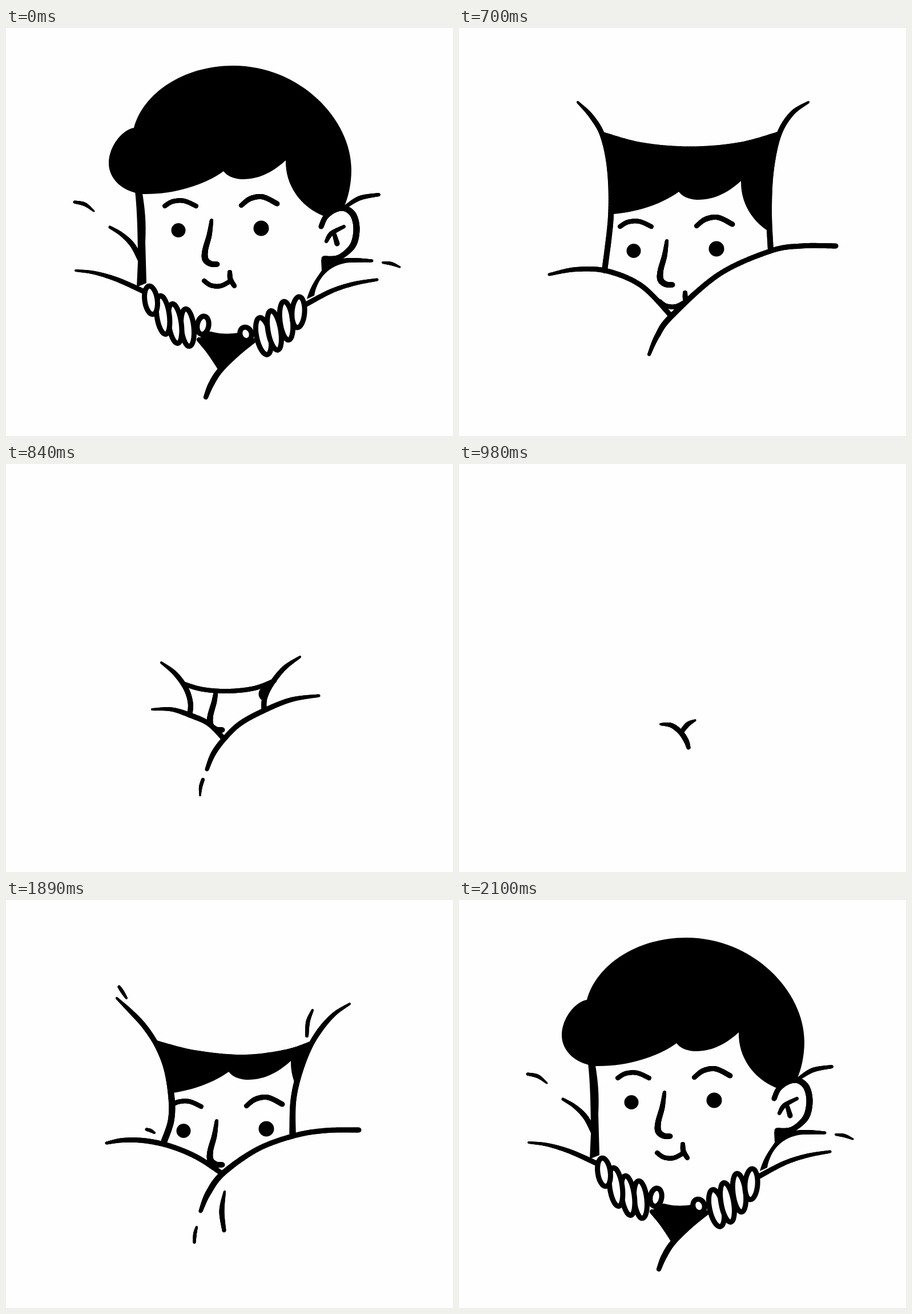
Animation, 783 px wide and 715 px high, one loop 2.66 s. Source, as an HTML page with a canvas:

```html
<!DOCTYPE html>
<html lang="en">
<head>
<meta charset="utf-8">
<title>Peekaboo</title>
<style>
  html, body { margin: 0; width: 100%; height: 100%; overflow: hidden; background: #fefefe; }
  canvas { display: block; }
</style>
</head>
<body>
<canvas id="stage" width="783" height="715"></canvas>
<script>
const ctx = document.getElementById('stage').getContext('2d');
const INK = '#000', PAPER = '#fefefe';
const LOOP = 2660, STEP = 70, CLOSE_AT = 630, OPEN_AT = 1750;

function spline(a, b, c, d, t) {
  return b + t / 2 * (c - a + t * (2 * a - 5 * b + 4 * c - d + t * (3 * (b - c) + d - a)));
}

// Smooth stroke of varying width through x, y, width triples.
function brush(...v) {
  const last = v.length / 3 - 1;
  const at = (i, k) => v[Math.max(0, Math.min(last, i)) * 3 + k];
  const point = (i, t) => [0, 1, 2].map(k => spline(at(i - 1, k), at(i, k), at(i + 1, k), at(i + 2, k), t));
  let [px, py] = v;
  for (let i = 0; i < last; i++) {
    for (let s = 1; s <= 16; s++) {
      const [x, y, w] = point(i, s / 16);
      ctx.lineWidth = w;
      ctx.beginPath();
      ctx.moveTo(px, py);
      ctx.lineTo(x, y);
      ctx.stroke();
      [px, py] = [x, y];
    }
  }
}

function shape(d) {
  ctx.fill(new Path2D(d));
}

function dot(x, y, r) {
  ctx.beginPath();
  ctx.arc(x, y, r, 0, 7);
  ctx.fill();
}

function finger(x, y, rx, ry, tilt) {
  ctx.beginPath();
  ctx.ellipse(x, y, rx, ry, tilt * Math.PI / 180, 0, 7);
  ctx.fillStyle = PAPER;
  ctx.fill();
  ctx.fillStyle = INK;
  ctx.lineWidth = 9;
  ctx.stroke();
}

function head(dx, dy, opening) {
  ctx.save();
  if (opening) ctx.clip(new Path2D(opening));
  ctx.translate(dx, dy);
  // hair and cheek
  shape('M224 175C240 115 310 66 398 66C515 66 605 160 605 248C605 275 599 298 592 314L555 329C515 312 489 275 490 232C470 250 445 266 412 265C398 264 387 259 381 251C347 276 292 292 240 291C205 288 180 265 180 237C180 207 204 178 224 175Z');
  shape('M226 286L239 290C243 315 246 340 244 375L246 447L229 454L231 410C231 370 230 320 226 286Z');
  // brows and eyes
  brush(278, 312, 8, 292, 304, 8, 312, 303, 8, 333, 312, 8);
  brush(412, 311, 8, 428, 299, 9, 450, 296, 9, 475, 308, 9);
  dot(302, 354.5, 12.5);
  dot(447, 351, 13.5);
  // nose and mouth
  brush(360, 337, 6, 356, 363, 9, 349, 389, 10, 349, 405, 11, 358, 413, 10, 370, 414, 9);
  brush(347, 443, 8, 359, 451, 8, 376, 452, 8, 394, 443, 8);
  brush(392, 428, 8, 393, 440, 9, 400, 452, 8);
  // ear
  brush(552, 348, 9, 560, 331, 9, 576, 319, 9, 593, 316, 10, 608, 327, 11, 614, 350, 11, 610, 376, 11, 598, 392, 10, 580, 403, 9, 557, 404, 9);
  brush(561, 374, 6, 570, 360, 8, 592, 348, 6);
  brush(575, 361, 7, 580, 378, 9);
  ctx.restore();
}

function open() {
  head(0, 0);
  shape('M552 406L553 425C545 437 534 450 527 475L540 469C545 440 565 414 602 411L600 403Z');
  shape('M338 545C350 531 357 531 363 533C380 537 395 536 407 534L412 545L432 552C405 572 385 588 374 601C365 588 350 566 338 548Z');
  brush(434, 548, 8, 405, 571, 9, 375, 600, 10, 359, 625, 10, 350, 647, 8);
  brush(338, 546, 8, 356, 568, 8, 374, 595, 8);
  brush(120, 305, 5, 138, 309, 6.5, 154, 321, 3);
  brush(182, 349, 5, 203, 362, 7, 222, 381, 9, 236, 408, 9);
  brush(122, 425, 4, 155, 429, 6, 195, 441, 8, 242, 462, 9);
  brush(595, 313, 6, 620, 298, 8, 653, 292, 6);
  brush(598, 407, 8, 620, 407, 7, 641, 408, 5);
  brush(660, 411, 4, 675, 413, 6, 690, 419, 3);
  brush(650, 441, 5, 610, 448, 7, 570, 461, 8, 526, 484, 9);
  finger(345, 521, 10, 16, 10);
  finger(318, 525, 11, 33, -6);
  finger(296, 518, 11, 35, -8);
  finger(275, 503, 11, 34, -8);
  finger(254, 477, 11, 25, -8);
  finger(420, 536, 10, 12, -20);
  finger(451, 540, 12, 33, -12);
  finger(470, 530, 11, 35, -10);
  finger(491, 513, 11, 34, -7);
  finger(512, 498, 11, 27, 4);
}

function gathered() {
  head(0, 22, 'M100 119H237C300 140 420 150 503 134C525 172 575 195 640 184H783V344H711C620 365 550 405 515 458L360 550L270 460C245 400 210 350 163 327H100Z');
  brush(237, 119, 5, 270, 130, 7, 325, 140, 7, 385, 143, 7, 450, 140, 7, 515, 127, 7, 555, 109, 7);
  brush(503, 136, 7, 530, 166, 8, 565, 184, 8, 605, 189, 9, 637, 184, 8);
  brush(163, 327, 6, 200, 350, 7, 240, 393, 9, 270, 460, 10);
  brush(132, 439, 5, 175, 438, 7, 225, 449, 8, 275, 470, 9);
  brush(202, 318, 5, 209, 326, 6, 216, 340, 4);
  brush(603, 295, 7, 625, 271, 8, 646, 256, 6);
  brush(643, 336, 3, 657, 323, 5, 675, 316, 5);
  brush(710, 344, 8, 650, 360, 8, 595, 382, 9, 550, 412, 9, 515, 458, 9);
  brush(716, 420, 9, 640, 428, 8, 570, 443, 8, 497, 470, 8);
  brush(345, 532, 9, 364, 550, 9);
  brush(402, 526, 8, 365, 551, 9, 340, 578, 8, 322, 601, 5);
  finger(357, 513, 10, 20, 14);
  finger(333, 507, 11, 29, -6);
  finger(312, 502, 11, 32, -8);
  finger(287, 484, 11, 30, -6);
  finger(389, 510, 9, 18, -4);
  finger(411, 509, 10, 24, -8);
  finger(432, 503, 11, 32, 0);
  finger(457, 492, 11, 29, 0);
  finger(485, 479, 13, 27, 10);
}

function narrowing() {
  head(4, 36, 'M250 185C330 215 460 220 560 185C545 250 540 310 545 390C480 410 420 455 372 505C340 465 300 435 255 425C270 340 270 260 250 185Z');
  brush(250, 185, 7, 320, 204, 7, 405, 211, 7, 490, 204, 7, 560, 185, 7);
  brush(208, 130, 4, 232, 155, 8, 252, 190, 9, 264, 250, 9, 266, 330, 10, 255, 425, 10);
  brush(612, 130, 4, 583, 150, 8, 560, 188, 9, 547, 250, 9, 543, 320, 10, 546, 390, 10);
  brush(158, 432, 5, 205, 423, 8, 260, 426, 9, 320, 452, 9, 372, 505, 9);
  brush(660, 382, 9, 600, 382, 9, 545, 391, 9, 455, 432, 9, 372, 505, 10, 347, 540, 9, 333, 572, 6);
}

function peeking() {
  head(9, 50, 'M262 247C340 275 470 283 541 248C505 310 495 360 502 410C450 425 410 450 380 479C345 450 310 432 276 424C295 390 297 310 262 247Z');
  brush(198, 152, 5, 204, 161, 6, 211, 172, 4);
  brush(194, 172, 4, 220, 197, 8, 243, 222, 9, 265, 256, 9, 281, 297, 9, 290, 348, 11, 289, 387, 11, 277, 423, 11);
  brush(263, 249, 6, 330, 266, 6, 415, 274, 6, 490, 265, 6, 538, 249, 6);
  brush(602, 182, 4, 575, 200, 7, 550, 228, 9, 530, 262, 9, 512, 310, 10, 503, 355, 10, 502, 410, 11);
  brush(537, 193, 4, 529, 213, 7, 527, 238, 6);
  brush(246, 402, 5, 253, 404, 6, 260, 408, 4);
  brush(176, 426, 5, 205, 421, 8, 245, 422, 9, 290, 432, 9, 335, 451, 9, 378, 479, 9);
  brush(618, 403, 9, 560, 404, 9, 505, 413, 9, 440, 437, 9, 380, 479, 10, 354, 514, 10, 341, 545, 7);
  brush(383, 511, 4, 378, 545, 9, 382, 579, 7);
  brush(334, 573, 4, 331, 585, 6, 330, 600, 5);
}

function sliver() {
  head(9, 52, 'M310 385C350 402 430 402 470 380C455 400 450 415 452 432C425 443 400 460 382 482C365 462 345 448 322 440C325 420 322 400 310 385Z');
  brush(310, 385, 8, 345, 395, 8, 390, 398, 8, 435, 393, 8, 470, 380, 8);
  brush(272, 348, 4, 296, 367, 8, 315, 393, 9, 323, 418, 9, 322, 440, 9);
  brush(515, 338, 4, 487, 358, 8, 464, 387, 9, 453, 411, 9, 452, 432, 9);
  brush(256, 430, 4, 290, 430, 7, 322, 440, 9, 355, 455, 9, 382, 482, 9);
  brush(548, 406, 5, 500, 413, 8, 452, 432, 9, 410, 455, 9, 382, 482, 9, 363, 508, 9, 352, 535, 7);
  brush(345, 553, 6, 341, 566, 6, 340, 581, 3);
}

function nearlyShut() {
  brush(328, 431, 4, 345, 439, 7, 365, 455, 9, 384, 480, 9);
  brush(362, 451, 8, 385, 456, 8, 406, 453, 8);
  brush(472, 402, 3, 440, 421, 8, 405, 453, 9, 383, 482, 9, 364, 516, 8);
  brush(356, 535, 6, 352, 547, 7, 350, 563, 3);
}

function shut() {
  brush(353, 456, 4, 372, 458, 8, 388, 470, 9, 398, 485, 9, 402, 497, 7);
  brush(414, 449, 3, 401, 456, 8, 390, 469, 8);
}

const poses = [open, gathered, narrowing, peeking, sliver, nearlyShut, shut];

function poseAt(t) {
  const steps = start => Math.max(0, Math.min(6, Math.floor((t - start) / STEP) + 1));
  return steps(CLOSE_AT) - steps(OPEN_AT);
}

function draw(pose) {
  ctx.fillStyle = PAPER;
  ctx.fillRect(0, 0, 783, 715);
  ctx.fillStyle = ctx.strokeStyle = INK;
  ctx.lineCap = 'round';
  poses[pose]();
}

let shown = 0;
const start = performance.now();

function tick() {
  const pose = poseAt((performance.now() - start) % LOOP);
  if (pose !== shown) draw(shown = pose);
  requestAnimationFrame(tick);
}

draw(shown);
tick();
</script>
</body>
</html>
```
